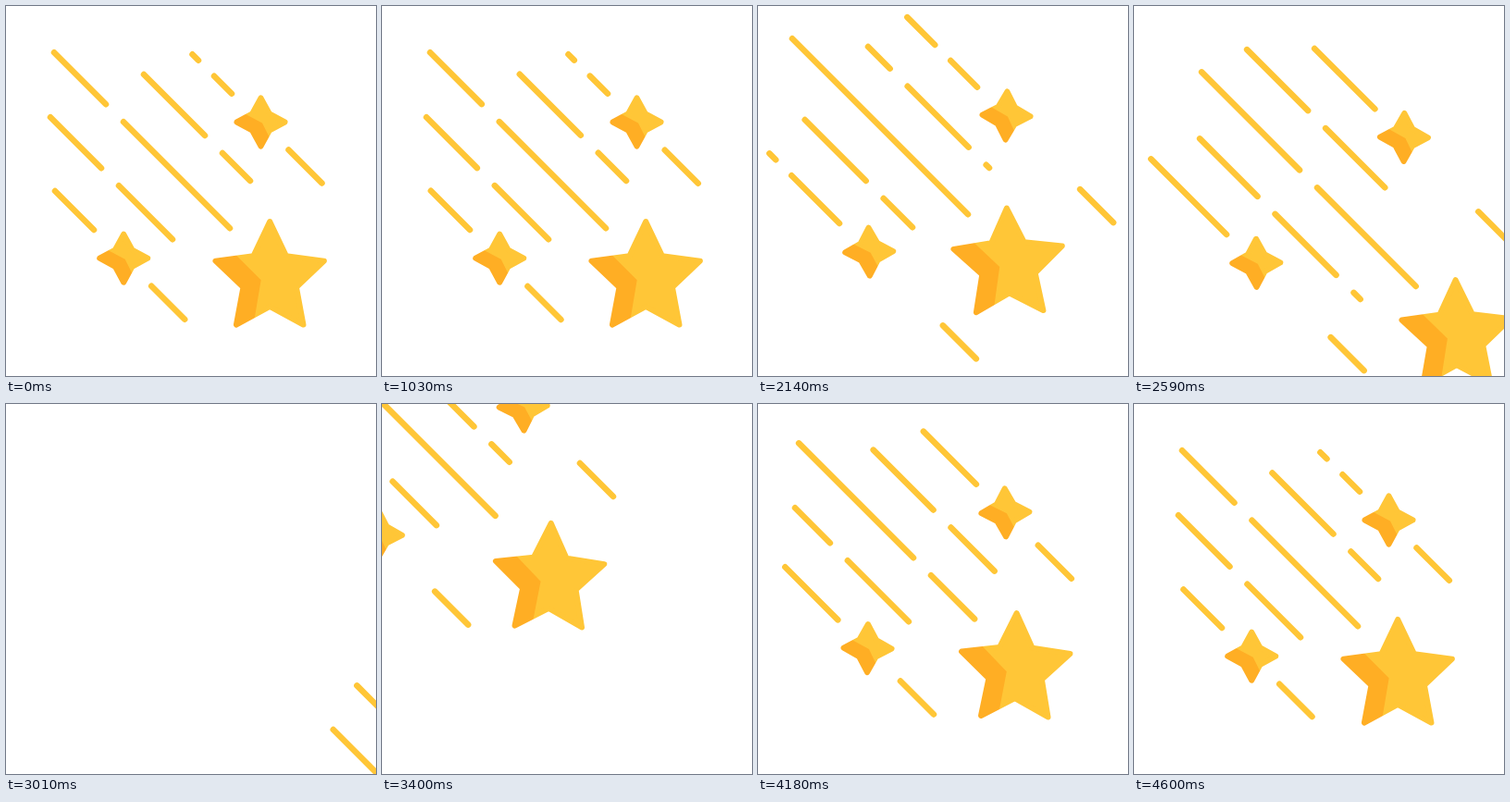
Recreate the animation shown at these times as an HTML page with a canvas. Size 400 by 400 pixels, loop 4630 ms.

```html
<!DOCTYPE html>
<html lang="en">
<head>
<meta charset="utf-8">
<title>Shooting stars</title>
<style>
  html, body { margin: 0; width: 100%; height: 100%; overflow: hidden; background: #fff; }
  canvas { display: block; width: 400px; height: 400px; }
</style>
</head>
<body>
<canvas id="stage" width="400" height="400"></canvas>
<script>
const ctx = document.getElementById('stage').getContext('2d');
const LOOP = 4630, START = 1030, JUMP = 3120, END = 4604;
const LIGHT = '#ffc637', DARK = '#ffae24';
const TAIL_LAG = 100;

const clamp = p => Math.min(1, Math.max(0, p));
const progress = (from, to, t) => clamp((t - from) / (to - from));
const sineEase = p => (1 - Math.cos(Math.PI * p)) / 2;

// Diagonal offset: pull back, shoot out bottom right, glide in from top left
function travel({ pull, launch, glide }, t) {
  if (t < JUMP) {
    return 560 * progress(launch, JUMP, t) ** 2 - pull * sineEase(progress(START, 2030, t));
  }
  const entry = 400 * (1 - progress(JUMP, 3300, t)) ** 2;
  return -entry - glide * (Math.max(0, END + 26 - t) / 780) ** 2.7;
}

// Distance the trail dashes have run back from the stars
const FLOW = 765;
const flowKeys = [[START, 0], [1510, 90], [2140, 228], [2590, 374], [3400, 499], [3850, 644], [END, FLOW]];
function trailFlow(t) {
  let flow = 0;
  for (let i = 1; i < flowKeys.length; i++) {
    const [from, a] = flowKeys[i - 1], [to, b] = flowKeys[i];
    flow += (b - a) * progress(from, to, t);
  }
  return flow;
}

const starPoints = (tips, outer, inner) => Array.from({ length: tips * 2 }, (_, i) => {
  const angle = Math.PI * i / tips, radius = i % 2 ? inner : outer;
  return [radius * Math.sin(angle), -radius * Math.cos(angle)];
});

const smallShape = {
  points: starPoints(4, 26, 13),
  shade: [[-23, -12], [1.5, 1], [11, 20], [0, 32], [-32, 32], [-32, -12]]
};
const upperMove = { pull: 7, launch: 2455, glide: 36 };
const lowerMove = { pull: 7, launch: 2500, glide: 38.5 };

const stars = [
  { x: 285.2, y: 294.7, tilt: -1.8, pull: 14.5, launch: 2277, glide: 30.5,
    points: starPoints(5, 61.7, 30.2),
    shade: [[-45, -34], [-9.5, 1.5], [-18, 52], [-18, 60], [-70, 60], [-70, -34]] },
  { x: 275.5, y: 125.5, tilt: 2.2, ...upperMove, ...smallShape },
  { x: 127.2, y: 272.7, tilt: -1.5, ...lowerMove, ...smallShape }
];

// x, y: leading end; first: distance to the first gap; cycles: dashes passing per loop
const longTrails = [
  { x: 242, y: 240.3, first: 115, cycles: 2, length: 190, pull: 15, launch: 2277, glide: 35 },
  { x: 264, y: 189, first: 30, cycles: 9, length: 131, pull: 14, launch: 2463, glide: 37 },
  { x: 180, y: 252.3, first: 58, cycles: 9, length: 132, pull: 13, launch: 2277, glide: 35.5 }
];
const shortTrails = [
  { x: 244, y: 94.8, first: 19, ...upperMove },
  { x: 95, y: 242, first: 42, ...lowerMove }
];

function trace(points) {
  ctx.beginPath();
  points.forEach(([x, y]) => ctx.lineTo(x, y));
  ctx.closePath();
}

function drawStar(star, t) {
  const s = travel(star, t);
  const swing = Math.sin(2 * Math.PI * progress(START, END, t));
  ctx.save();
  ctx.translate(star.x + s, star.y + s);
  ctx.rotate(star.tilt * swing * Math.PI / 180);
  ctx.fillStyle = LIGHT;
  ctx.lineWidth = 6;
  trace(star.points);
  ctx.fill();
  ctx.stroke();
  ctx.globalCompositeOperation = 'source-atop';
  ctx.fillStyle = DARK;
  trace(star.shade);
  ctx.fill();
  ctx.restore();
}

// Diagonal dashed line; all distances are measured along x
function drawDashes(x, y, from, to, dash, gap, offset) {
  ctx.setLineDash([dash * Math.SQRT2, gap * Math.SQRT2]);
  ctx.lineDashOffset = -offset * Math.SQRT2;
  ctx.beginPath();
  ctx.moveTo(x + from, y + from);
  ctx.lineTo(x + to, y + to);
  ctx.stroke();
}

function drawTrail(trail, length, cycles, gap, t) {
  const s = travel(trail, t), period = FLOW / cycles;
  const offset = (trail.first + gap + trailFlow(t)) % period;
  drawDashes(trail.x + s, trail.y + s, 0, -length, period - gap, gap, offset);
}

function draw(t) {
  ctx.clearRect(0, 0, 400, 400);
  ctx.strokeStyle = LIGHT;
  ctx.lineCap = ctx.lineJoin = 'round';
  ctx.setLineDash([]);
  stars.forEach(star => drawStar(star, t));

  ctx.lineWidth = 6.5;
  const run = progress(START, END, t);
  for (const trail of longTrails) {
    const stretch = t < JUMP ? travel(trail, t) - travel(trail, t - TAIL_LAG) : 0;
    drawTrail(trail, trail.length + Math.max(0, stretch), trail.cycles, 19, t);
  }
  for (const trail of shortTrails) {
    drawTrail(trail, 42.5 + 40 * Math.sin(Math.PI * run), 7, 17, t);
  }

  // Dashes running ahead of the small stars
  const reach = 121 - 55 * Math.sin(Math.PI / 2 * progress(4050, END, t));
  for (const star of stars.slice(1)) {
    const s = travel(star, t);
    drawDashes(star.x + s, star.y + s, 30, reach, 36, 66, run * 8 * 102 % 102);
  }
}

const begin = performance.now();
function tick() {
  draw((performance.now() - begin) % LOOP);
  requestAnimationFrame(tick);
}
tick();
</script>
</body>
</html>
```
